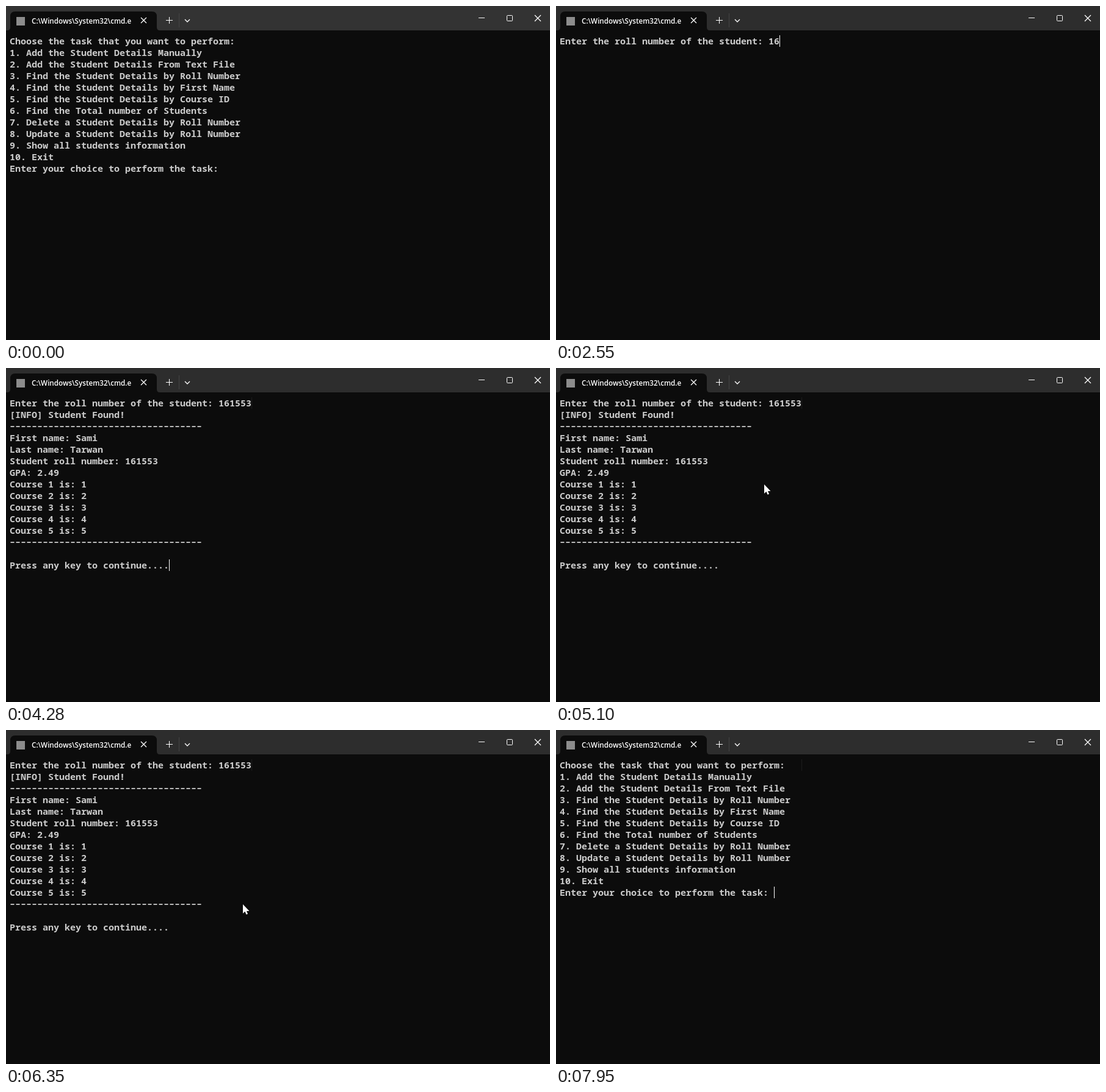
These frames come from a looping animation (891 by 548 pixels, 8000 ms). An HTML page:

```html
<!DOCTYPE html>
<html lang="en">
<head>
<meta charset="utf-8">
<title>Student records console</title>
<style>
  html, body { margin: 0; width: 100%; height: 100%; overflow: hidden; background: #0c0c0c; }
  svg { position: absolute; left: 0; top: 0; }
  pre {
    position: absolute; left: 6px; top: 48px; margin: 0; color: #ccc;
    font: 600 15px/19px "Noto Sans Mono", monospace; font-variant-ligatures: none;
  }
  pre i { position: relative; top: -1px; font-style: normal; }
  #title { font: 600 11.65px "Open Sans", sans-serif; fill: #fff; }
  .line { fill: none; stroke: #fff; }
</style>
</head>
<body>
<pre id="screen"></pre>
<svg width="891" height="548">
  <rect id="bar" width="891" height="40"/>
  <path fill="#0c0c0c" d="M2 40Q7 40 7 35V17Q7 9 15 9H239Q247 9 247 17V35Q247 40 252 40Z"/>
  <rect x="17" y="18" width="14" height="14" fill="#8c8c8c"/>
  <text id="title" x="42" y="29">C:\Windows\System32\cmd.e</text>
  <path stroke="#444" d="M283.5 12V35"/>
  <path class="line" stroke-width="1.3" d="M221 19l9 9m0-9l-9 9M866 15l10 10m0-10l-10 10M293 22l4 4 4-4"/>
  <path class="line" d="M262 23.5h11M267.5 18v11M774 19.5h10"/>
  <rect class="line" x="820.5" y="15.5" width="9" height="9" rx="1"/>
  <rect id="ghost" x="402" y="48" width="1" height="19" fill="#1d1d1d"/>
  <rect id="caret" width="1" height="19" fill="#fff"/>
  <path id="mouse" fill="#fff" d="M1 1V16L4.4 12.8L6.6 17.7L9 16.7L7 12H11.5Z"/>
</svg>
<script>
const el = id => document.getElementById(id);
const LOOP = 8000, ROLL = "161553", RULE = `<i>${"–".repeat(35)}</i>`;
const keyTimes = [1950, 2550, 2880, 3290, 3620, 3950];

const menu = `Choose the task that you want to perform:
1. Add the Student Details Manually
2. Add the Student Details From Text File
3. Find the Student Details by Roll Number
4. Find the Student Details by First Name
5. Find the Student Details by Course ID
6. Find the Total number of Students
7. Delete a Student Details by Roll Number
8. Update a Student Details by Roll Number
9. Show all students information
10. Exit
Enter your choice to perform the task: `;
const prompt = "Enter the roll number of the student: ";
const courses = [1, 2, 3, 4, 5].map(n => `Course ${n} is: ${n}`).join("\n");
const result = `${prompt}${ROLL}
[INFO] Student Found!
${RULE}
First name: Sami
Last name: Tarwan
Student roll number: ${ROLL}
GPA: 2.49
${courses}
${RULE}

Press any key to continue....`;

// Pointer appearances: start, end, sampling step, [time, x, y] stops
const moves = [
  [200, 1280, 80, [[200, 815, 510], [680, 761, 445]]],
  [4540, 6620, 70, [[4540, 749, 443], [4680, 630, 280], [4820, 500, 168], [4960, 398, 137],
    [5100, 340, 190], [5310, 346, 246], [5660, 362, 270], [6150, 381, 285], [6290, 387, 285]]],
  [7490, 7950, 70, [[7490, 390, 285]]]
];
const within = (t, a, b) => t >= a && t < b;

function text(t) {
  if (t < 1280 || t >= 6620) return menu;
  if (t < 1550) return menu + "3";
  if (t < 4280) return prompt + ROLL.slice(0, keyTimes.filter(k => t >= k).length);
  return result;
}

function caretOn(t) {
  return within(t, 680, 1210) || within(t, 1280, 4810) || within(t, 5380, 5870) ||
    within(t, 6620, 7220) || t >= 7750;
}

function pointer(t) {
  const move = moves.find(m => within(t, m[0], m[1]));
  if (!move) return null;
  const [start, , step, stops] = move;
  const time = start + Math.floor((t - start) / step) * step;
  const i = stops.findIndex(s => s[0] > time);
  if (i < 0) return stops[stops.length - 1].slice(1);
  const a = stops[i - 1], b = stops[i], k = (time - a[0]) / (b[0] - a[0]);
  return [1, 2].map(n => Math.round(a[n] + (b[n] - a[n]) * k));
}

function show(node, on) { node.setAttribute("visibility", on ? "visible" : "hidden"); }

function draw(t) {
  const s = text(t), rows = s.split("\n");
  if (el("screen").innerHTML !== s) el("screen").innerHTML = s;
  el("bar").setAttribute("fill", t < 680 ? "#333" : "#2d2d2d");
  el("caret").setAttribute("x", 6 + 9 * rows[rows.length - 1].length);
  el("caret").setAttribute("y", 29 + 19 * rows.length);
  show(el("caret"), caretOn(t));
  show(el("ghost"), t >= 4280);
  const p = pointer(t);
  show(el("mouse"), p);
  if (p) el("mouse").setAttribute("transform", `translate(${p})`);
}

const begin = performance.now();
function tick() {
  draw((performance.now() - begin) % LOOP);
  requestAnimationFrame(tick);
}
tick();
</script>
</body>
</html>
```
